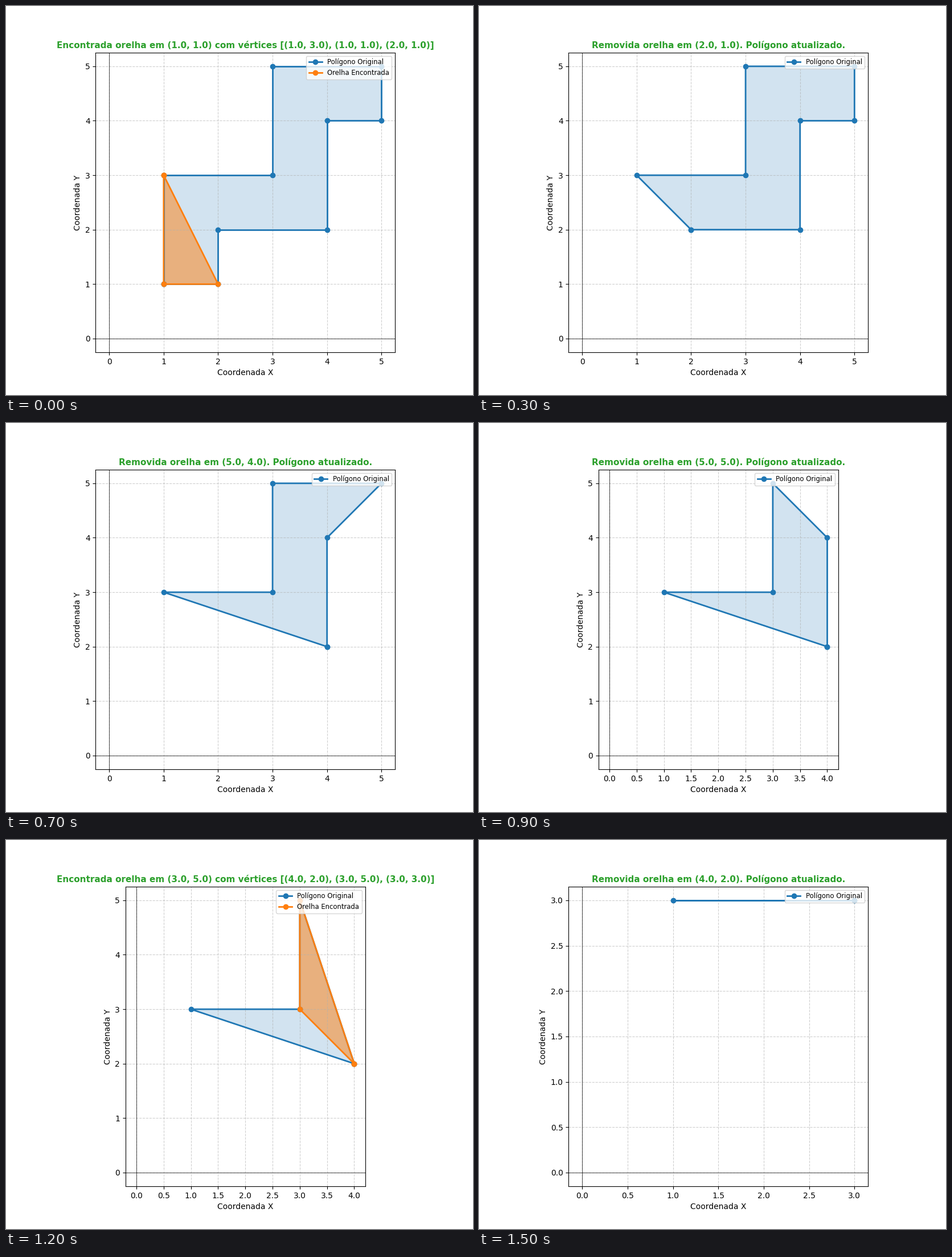
Write a matplotlib script that moves like this. It is 820 by 683 pixels and loops after 1.6 s.

```python
import matplotlib.pyplot as plt
from matplotlib.animation import FuncAnimation

BLUE, ORANGE, GREEN = "tab:blue", "tab:orange", "tab:green"
POLYGON = [(1, 1), (2, 1), (2, 2), (4, 2), (4, 4),
           (5, 4), (5, 5), (3, 5), (3, 3), (1, 3)]
POLYGON = [(float(x), float(y)) for x, y in POLYGON]


def cross(a, b, c):
    return (b[0] - a[0]) * (c[1] - a[1]) - (b[1] - a[1]) * (c[0] - a[0])


def inside(p, tri):
    a, b, c = tri
    return min(cross(a, b, p), cross(b, c, p), cross(c, a, p)) >= 0


def find_ear(poly):
    """First convex corner whose triangle holds no other vertex."""
    for i, tip in enumerate(poly):
        tri = [poly[i - 1], tip, poly[(i + 1) % len(poly)]]
        others = [p for p in poly if p not in tri]
        if cross(*tri) > 0 and not any(inside(p, tri) for p in others):
            return tri


def clip_ears(poly):
    """List of (title, polygon, ear or None), two entries per ear."""
    steps = []
    while len(poly) > 2:
        ear = find_ear(poly)
        tip = ear[1]
        steps.append((f"Encontrada orelha em {tip} com vértices {ear}", poly, ear))
        poly = [p for p in poly if p != tip]
        steps.append((f"Removida orelha em {tip}. Polígono atualizado.", poly, None))
    return steps


def draw_shape(points, color, alpha, label):
    xs, ys = zip(*points, points[0])
    ax.plot(xs, ys, "o-", color=color, lw=2, label=label)
    ax.fill(xs, ys, color=color, alpha=alpha)


def draw(frame):
    title, poly, ear = STEPS[frame]
    ax.clear()
    draw_shape(poly, BLUE, 0.2, "Polígono Original")
    if ear:
        draw_shape(ear, ORANGE, 0.5, "Orelha Encontrada")
    ax.set_title(title, fontsize=11, fontweight="bold", color=GREEN)
    ax.set_xlabel("Coordenada X")
    ax.set_ylabel("Coordenada Y")
    ax.axhline(0, color="black", lw=0.5)
    ax.axvline(0, color="black", lw=0.5)
    ax.grid(True, linestyle="--", alpha=0.6)
    ax.set_aspect("equal", adjustable="box")
    ax.legend(loc="upper right", fontsize="small")


STEPS = clip_ears(POLYGON)
# The tiny excess keeps float rounding from losing a pixel.
fig, ax = plt.subplots(figsize=(8.2001, 6.8301), dpi=100)
anim = FuncAnimation(fig, draw, frames=len(STEPS), init_func=lambda: None,
                     interval=100, repeat=True)
plt.show()
```
